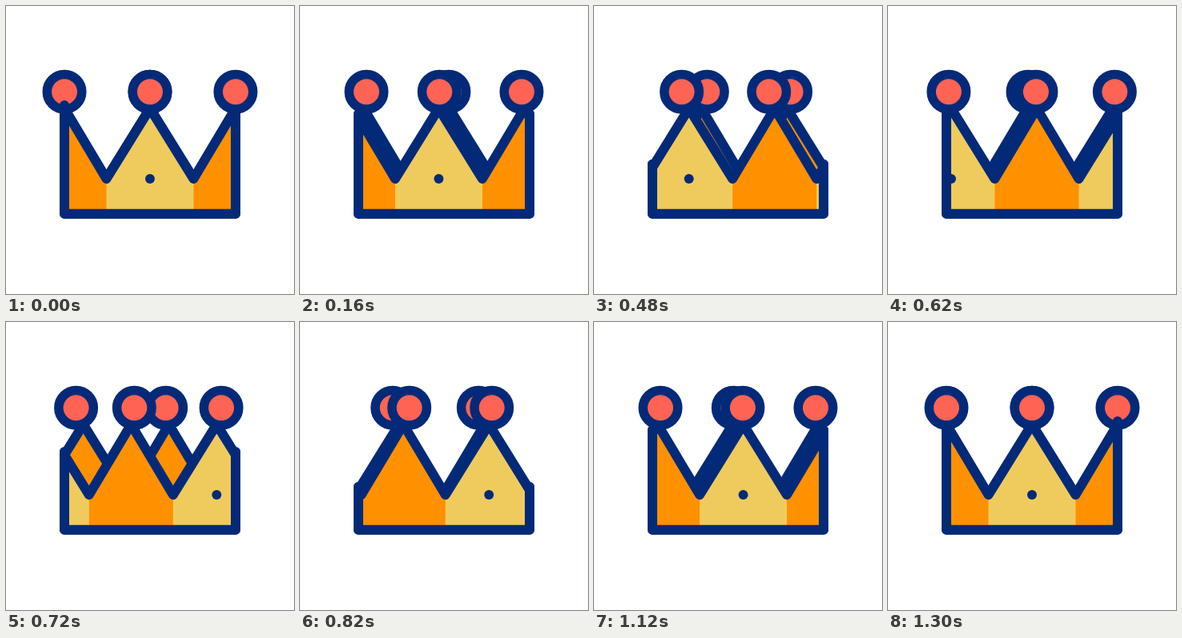
An HTML page with a canvas that plays this animation: 360 px wide and 360 px high, repeating every 1420 ms.

```html
<!DOCTYPE html>
<html lang="en">
<head>
<meta charset="utf-8">
<title>Turning crown</title>
<style>
html, body { margin: 0; width: 100%; height: 100%; overflow: hidden; background: #fff; }
canvas { display: block; width: 360px; height: 360px; }
</style>
</head>
<body>
<canvas id="stage" width="360" height="360"></canvas>
<script>
const ctx = document.getElementById('stage').getContext('2d');
const NAVY = '#032a78', RED = '#ff6353', YELLOW = '#efcb5e', ORANGE = '#ff9100';
const LEFT = 73, RIGHT = 287, WIDTH = RIGHT - LEFT, MID = 180, BASE = 259.7;
const PEAK = 128, VALLEY = 216, HALF_TILE = 54.5, POST = 4;
const LOOP = 1420, TURN = 1300, LEAD = 10, STEP = 20;

const lerp = (a, b, k) => a + (b - a) * k;
const smooth = s => s * s * (3 - 2 * s);

function bezier(x1, y1, x2, y2) {
  const at = (a, b, u) => 3 * (1 - u) * (1 - u) * u * a + 3 * (1 - u) * u * u * b + u * u * u;
  return x => {
    let lo = 0, hi = 1;
    for (let i = 0; i < 24; i++) {
      const u = (lo + hi) / 2;
      if (at(x1, x2, u) < x) lo = u; else hi = u;
    }
    return at(y1, y2, lo);
  };
}
const slide = bezier(.45, 0, .55, 1);
const leaveLeft = bezier(.62, 0, .68, .74);
const leaveRight = bezier(.6, 0, .75, .75);

// Zigzag corners, alternating peak and valley, for a yellow tile centred at `center`.
function corners(center) {
  const list = [];
  for (let k = -2; k <= 2; k++) {
    const x = center + k * WIDTH;
    list.push([x - HALF_TILE, VALLEY], [x, PEAK], [x + HALF_TILE, VALLEY], [x + WIDTH / 2, PEAK]);
  }
  return list;
}

function heightAt(list, x) {
  const i = list.findIndex(p => p[0] > x);
  const [a, b] = [list[i - 1], list[i]];
  return lerp(a[1], b[1], (x - a[0]) / (b[0] - a[0]));
}

function wall(center) {
  const list = corners(center);
  const path = new Path2D();
  path.moveTo(LEFT, heightAt(list, LEFT));
  for (const [x, y] of list) if (x > LEFT && x < RIGHT) path.lineTo(x, y);
  path.lineTo(RIGHT, heightAt(list, RIGHT));
  path.lineTo(RIGHT, BASE);
  path.lineTo(LEFT, BASE);
  path.closePath();
  // Side posts stand a little above the zigzag.
  for (const x of [LEFT, RIGHT]) {
    path.moveTo(x, heightAt(list, x) - POST);
    path.lineTo(x, BASE);
  }
  return path;
}

function outline(path) {
  ctx.strokeStyle = NAVY;
  ctx.lineWidth = 12;
  ctx.lineJoin = ctx.lineCap = 'round';
  ctx.stroke(path);
}

function ball(x) {
  ctx.beginPath();
  ctx.arc(x, 107.2, 21.75, 0, 7);
  ctx.fillStyle = RED;
  ctx.fill();
  ctx.strokeStyle = NAVY;
  ctx.lineWidth = 11.5;
  ctx.stroke();
}

function drawBack(center) {
  const path = wall(center);
  ctx.fillStyle = ORANGE;
  ctx.fill(path);
  outline(path);
}

function drawFront(center) {
  const path = wall(center);
  ctx.save();
  ctx.clip(path);
  ctx.fillStyle = ORANGE;
  ctx.fillRect(0, 0, 360, 360);
  for (const x of [center, center + WIDTH]) {
    ctx.fillStyle = YELLOW;
    ctx.fillRect(x - HALF_TILE, 0, 2 * HALF_TILE, 360);
    ctx.fillStyle = NAVY;
    ctx.beginPath();
    ctx.arc(x, VALLEY, 6, 0, 7);
    ctx.fill();
  }
  ctx.restore();
  outline(path);
}

function draw(t) {
  const s = Math.min(1, (t + LEAD) / TURN);
  const center = MID - WIDTH * slide(s);
  // Two balls cross the full width, two swing from the middle to an edge and back.
  const cross = WIDTH * smooth(s);
  const away = 1 - Math.abs(2 * s - 1);
  const swings = [MID + WIDTH / 2 * leaveRight(away), MID - WIDTH / 2 * leaveLeft(away)];
  if (s >= .5) swings.reverse();

  ctx.fillStyle = '#fff';
  ctx.fillRect(0, 0, 360, 360);
  drawBack(2 * MID - center);
  ball(LEFT + cross);
  ball(swings[0]);
  drawFront(center);
  ball(RIGHT - cross);
  ball(swings[1]);
}

function frame() {
  const t = performance.now() % LOOP;
  draw(Math.floor(t / STEP) * STEP);
  requestAnimationFrame(frame);
}
frame();
</script>
</body>
</html>
```
